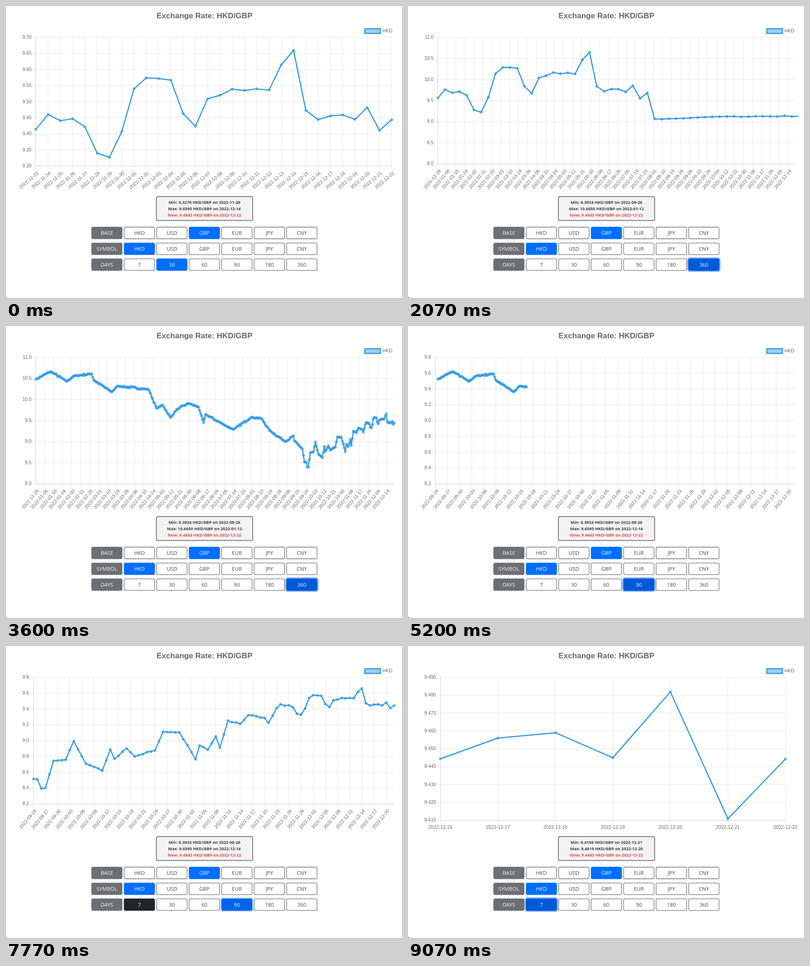
Write an HTML page that moves like this. It is 872 px wide and 642 px high and loops after 9.1 s.

```html
<!DOCTYPE html>
<html lang="en">
<head>
<meta charset="utf-8">
<title>Exchange Rate</title>
<style>
  html, body { margin: 0; width: 100%; height: 100%; overflow: hidden; background: #fff; }
  svg { display: block; width: 872px; height: 642px; }
  text { fill: #666; font: 10.3px "Liberation Sans", Arial, sans-serif; }
  .title { font-size: 17.05px; font-weight: bold; }
  .ui { font: 11.6px "Open Sans", "Noto Sans", sans-serif; }
  .stat { font: bold 9.05px "Open Sans", "Noto Sans", sans-serif; fill: #3a3d42; }
  .now { fill: #e2493f; }
  .grid { stroke: #000; stroke-opacity: .1; stroke-width: .9; fill: none; }
  .line { fill: none; stroke: #3097e6; stroke-width: 2.5; stroke-linejoin: round; }
  circle { fill: #36a2eb; fill-opacity: .5; stroke: #3097e6; stroke-width: .9; }
</style>
</head>
<body>
<svg id="stage" viewBox="0 0 872 642" xmlns="http://www.w3.org/2000/svg"></svg>
<script>
const LOOP = 9100, DAY = 864e5, LAST = Date.UTC(2022, 11, 22), TOP = 69;
const GLIDE = 1000, LAG = 16;
const stage = document.getElementById('stage');

function add(parent, tag, attrs, text) {
  const el = document.createElementNS('http://www.w3.org/2000/svg', tag);
  set(el, attrs);
  if (text !== undefined) el.textContent = text;
  parent.append(el);
  return el;
}
function set(el, attrs) {
  for (const k in attrs) el.setAttribute(k, attrs[k]);
}
const mix = (a, b, p) => a + (b - a) * p;

// Turning points of the year: day, rate
const turns = [
  [0, 10.48], [15, 10.665], [31, 10.43], [38, 10.56], [56, 10.61], [58, 10.46], [76, 10.18], [82, 10.32],
  [113, 10.24], [121, 9.79], [127, 9.87], [135, 9.57], [141, 9.76], [153, 9.91], [163, 9.82], [168, 9.45],
  [170, 9.65], [190, 9.38], [198, 9.29], [216, 9.58], [226, 9.55], [234, 9.27], [250, 9], [258, 9.14],
  [259, 9.02], [267, 8.83], [269, 8.52], [271, 8.51], [272, 8.3934], [273, 8.4], [275, 8.744], [278, 8.758],
  [280, 8.994], [283, 8.707], [287, 8.62], [289, 8.888], [290, 8.77], [293, 8.9], [295, 8.8], [300, 8.876],
  [302, 9.112], [306, 9.106], [310, 8.764], [311, 8.937], [313, 8.885], [315, 9.052], [316, 8.911],
  [318, 9.253], [321, 9.213], [323, 9.322], [327, 9.288], [328, 9.225], [330, 9.414]];
// Last thirty days
const latest = [
  9.414, 9.46, 9.441, 9.447, 9.422, 9.34, 9.327, 9.407, 9.54, 9.574, 9.572, 9.567, 9.463, 9.424, 9.509,
  9.52, 9.539, 9.535, 9.54, 9.536, 9.615, 9.6595, 9.473, 9.4444, 9.456, 9.459, 9.445, 9.4819, 9.4108, 9.4443];

let seed = 7;
const rand = () => (seed = seed * 16807 % 2147483647) / 2147483647;

// Straight runs between turns, with more wobble on longer ones
const rates = [];
for (let k = 1; k < turns.length; k++) {
  const [a, from] = turns[k - 1], [b, to] = turns[k];
  for (let d = a; d < b; d++) {
    const p = (d - a) / (b - a);
    const wobble = (rand() - .5) * Math.min(b - a, 10) * .005 * Math.sin(Math.PI * p);
    rates.push(mix(from, to, p) + wobble);
  }
}
rates.push(...latest);

const dateOf = back => new Date(LAST - back * DAY).toISOString().slice(0, 10);

const views = [
  { at: 0, n: 30, lo: 9.3, hi: 9.7, step: .05, dp: 2, skip: 1, right: 849.5 },
  { at: 1917, n: 360, lo: 8, hi: 11, step: .5, dp: 1, skip: 9, right: 855 },
  { at: 5185, n: 90, lo: 8.2, hi: 9.8, step: .2, dp: 1, skip: 3, right: 855 },
  { at: 8090, n: 7, lo: 9.41, hi: 9.49, step: .01, dp: 3, skip: 1, right: 831 }
];
for (const v of views) {
  const data = rates.slice(-v.n);
  v.left = 60 + 5.6 * (v.hi.toFixed(v.dp).length - 3);
  const gap = (v.right - v.left) / (v.n - 1);
  // Date labels tilt until they fit, up to 50 degrees
  const tilt = gap > 60 ? 0 : Math.min(50 * Math.PI / 180, Math.asin(Math.min(1, 17.5 / gap)));
  v.tilt = tilt * 180 / Math.PI;
  v.bottom = 395.4 - 52.7 * Math.sin(tilt) - 12.4 * Math.cos(tilt);
  v.x = i => v.left + gap * i;
  v.yOf = r => v.bottom - (r - v.lo) / (v.hi - v.lo) * (v.bottom - TOP);
  v.y = i => i < v.n ? v.yOf(data[i]) : v.bottom;
  v.stat = pick => {
    const r = pick(...data);
    return `${r.toFixed(4)} HKD/GBP on ${dateOf(v.n - 1 - data.indexOf(r))}`;
  };
}

// Fixed parts
add(stage, 'text', { class: 'title', x: 437, y: 27.3, 'text-anchor': 'middle' }, 'Exchange Rate: HKD/GBP');
add(stage, 'rect', { x: 790.2, y: 50, width: 34.3, height: 10.3, fill: '#9bd0f7', stroke: '#3097e6', 'stroke-width': 2.5 });
add(stage, 'text', { x: 829, y: 58.3 }, 'HKD');
add(stage, 'path', { d: 'M0 638.5L2.5 642H0Z', fill: '#777' });

const axes = add(stage, 'g', {});
const clip = add(add(stage, 'clipPath', { id: 'area' }), 'rect', {});
const line = add(stage, 'path', { class: 'line', 'clip-path': 'url(#area)' });
const dots = add(stage, 'g', {});
const pool = rates.map(() => add(dots, 'circle', { r: 2.6 }));

add(stage, 'rect', { x: 331.2, y: 419.2, width: 212, height: 52.4, rx: 3, fill: '#f3f3f3', stroke: '#707274', 'stroke-width': 1.8 });
const stats = ['stat', 'stat', 'stat now'].map((c, i) =>
  add(stage, 'text', { class: c, x: 437, y: 435.2 + 14 * i, 'text-anchor': 'middle' }));

// Looks: fill, border, text, ring opacity
const looks = {
  label: [[108, 111, 115], [108, 111, 115], [245, 245, 245], 0],
  plain: [[255, 255, 255], [112, 116, 120], [66, 69, 73], 0],
  hover: [[33, 37, 41], [33, 37, 41], [255, 255, 255], 0],
  on: [[0, 110, 255], [0, 110, 255], [240, 246, 255], 0],
  focus: [[0, 89, 214], [0, 84, 204], [240, 246, 255], .5]
};
const mixRgb = (a, b, p) => 'rgb(' + a.map((v, i) => Math.round(mix(v, b[i], p))) + ')';

function button(col, row, name, look) {
  const x = 188 + 71.55 * col, y = 485.6 + 34.8 * row;
  const ring = add(stage, 'rect', { x: x - 1.3, y: y - 1.3, width: 70.9, height: 29.4, rx: 4.5,
    fill: 'none', stroke: '#006eff', 'stroke-width': 2.6 });
  const box = add(stage, 'rect', { x: x + .65, y: y + .65, width: 67, height: 25.5, rx: 3, 'stroke-width': 1.3 });
  const text = add(stage, 'text', { class: 'ui', x: x + 34.2, y: y + 17.7, 'text-anchor': 'middle' }, name);
  const paint = (a, b, p) => {
    set(box, { fill: mixRgb(a[0], b[0], p), stroke: mixRgb(a[1], b[1], p) });
    text.style.fill = mixRgb(a[2], b[2], p);
    ring.setAttribute('stroke-opacity', mix(a[3], b[3], p));
  };
  paint(looks[look], looks[look], 1);
  return paint;
}

const coins = ['HKD', 'USD', 'GBP', 'EUR', 'JPY', 'CNY'];
[['BASE', 'GBP'], ['SYMBOL', 'HKD']].forEach(([name, picked], row) => {
  button(0, row, name, 'label');
  coins.forEach((c, i) => button(i + 1, row, c, c === picked ? 'on' : 'plain'));
});
button(0, 2, 'DAYS', 'label');
const days = [
  ['7', [0, 'plain'], [7500, 'hover'], [7800, 'focus']],
  ['30', [0, 'on'], [1740, 'plain']],
  ['60', [0, 'plain']],
  ['90', [0, 'plain'], [4400, 'hover'], [5000, 'focus'], [7690, 'on'], [7800, 'plain']],
  ['180', [0, 'plain']],
  ['360', [0, 'plain'], [640, 'hover'], [1640, 'focus'], [4900, 'on'], [5000, 'plain']]
].map(([name, ...steps], i) => ({ steps, paint: button(i + 1, 2, name, 'plain') }));

function drawAxes(v) {
  axes.textContent = '';
  const snap = p => Math.floor(p) + .5;
  const rule = d => add(axes, 'path', { class: 'grid', d });
  const rows = Math.round((v.hi - v.lo) / v.step);
  for (let i = 0; i <= rows; i++) {
    const rate = v.lo + i * v.step, y = v.yOf(rate);
    rule(`M${v.left - 6.9} ${snap(y)}H${v.right}`);
    add(axes, 'text', { x: v.left - 9.4, y: y + 3.1, 'text-anchor': 'end' }, rate.toFixed(v.dp));
  }
  for (let i = 0; i < v.n; i += v.skip) {
    const x = v.x(i);
    rule(`M${snap(x)} ${TOP}V${v.bottom + 6.9}`);
    add(axes, 'text', { y: 9.8, 'text-anchor': v.tilt ? 'end' : 'middle',
      transform: `translate(${x} ${v.bottom + 9.4}) rotate(${-v.tilt})` }, dateOf(v.n - 1 - i));
  }
  rule(`M${snap(v.left)} ${TOP}V${v.bottom}`);
  rule(`M${v.left} ${snap(v.bottom)}H${v.right}`);
  set(clip, { x: v.left - 3.9, y: TOP - 3.9, width: v.right - v.left + 7.8, height: v.bottom - TOP + 7.8 });
  stats[0].textContent = 'Min: ' + v.stat(Math.min);
  stats[1].textContent = 'Max: ' + v.stat(Math.max);
  stats[2].textContent = 'Now: ' + v.stat((...all) => all[all.length - 1]);
}

function drawLine(v, old, p) {
  let d = '';
  pool.forEach((dot, i) => {
    if (i >= v.n) return dot.setAttribute('display', 'none');
    const x = mix(old.x(i), v.x(i), p), y = mix(old.y(i), v.y(i), p);
    d += (i ? 'L' : 'M') + x.toFixed(2) + ' ' + y.toFixed(2);
    const shown = x < v.right + .5 && y < v.bottom + .5;
    set(dot, { cx: x, cy: y, display: shown ? 'inline' : 'none' });
  });
  line.setAttribute('d', d);
}

const clamp = p => Math.max(0, Math.min(1, p));
let current = -1, settled = false;
function render(t) {
  const k = views.findLastIndex(v => v.at <= t), v = views[k];
  if (k !== current) {
    current = k;
    settled = false;
    drawAxes(v);
  }
  const p = k ? clamp((t - v.at - LAG) / GLIDE) : 1;
  if (p < 1 || !settled) drawLine(v, views[Math.max(0, k - 1)], 1 - (1 - p) ** 4);
  settled = p === 1;

  for (const { steps, paint } of days) {
    const s = steps.findLastIndex(e => e[0] <= t);
    const from = looks[steps[Math.max(0, s - 1)][1]], to = looks[steps[s][1]];
    paint(from, to, s ? clamp((t - steps[s][0]) / 150) : 1);
  }
}

const start = performance.now();
function tick() {
  render((performance.now() - start) % LOOP);
  requestAnimationFrame(tick);
}
tick();
</script>
</body>
</html>
```
